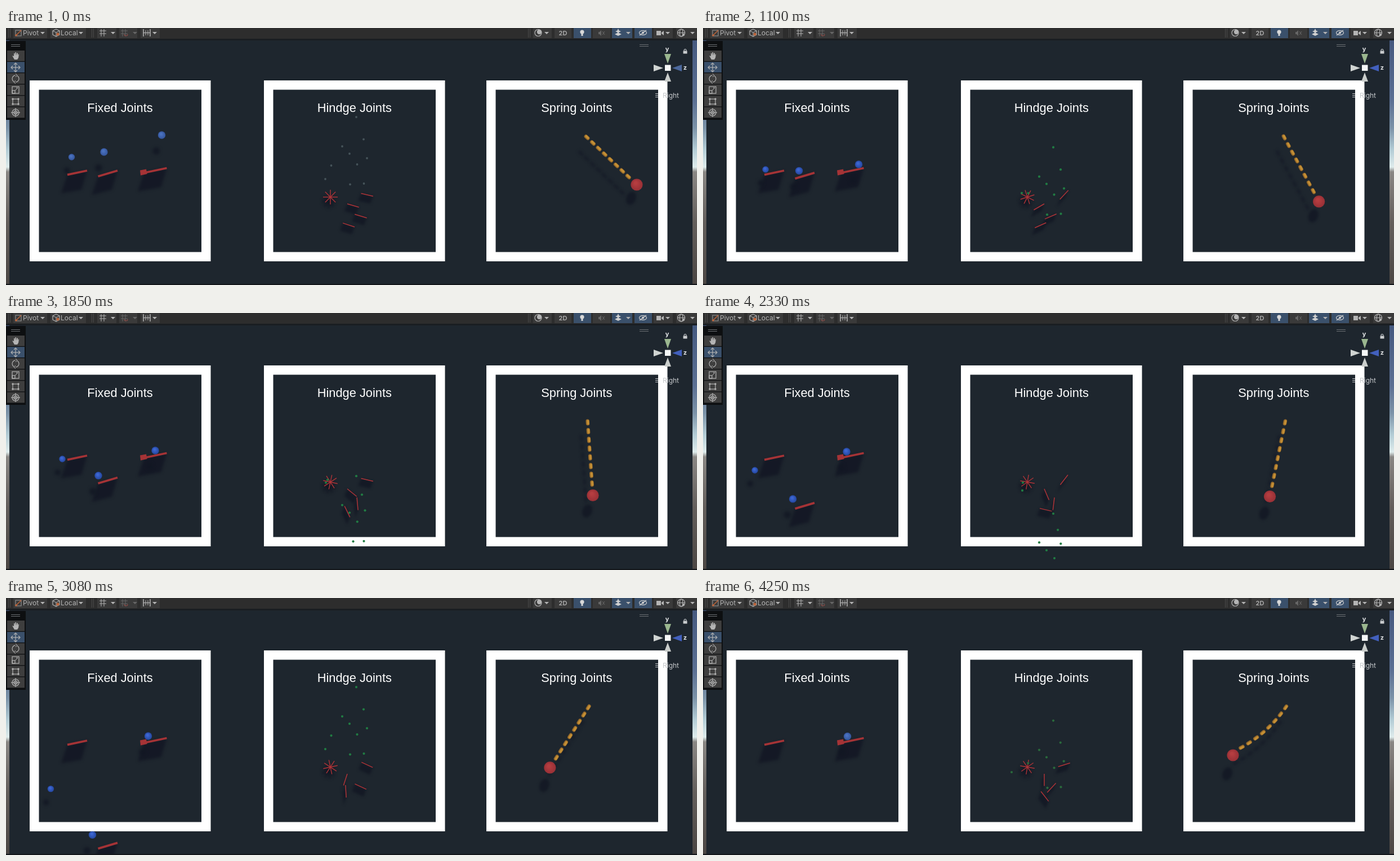
Recreate the animation shown at these times as an HTML page with a canvas. Size 1227x456 px, loop 4310 ms.

```html
<!DOCTYPE html>
<html lang="en">
<head>
<meta charset="utf-8">
<title>Physics joints</title>
<style>
  html, body { margin: 0; width: 100%; height: 100%; overflow: hidden; background: #1e262e; }
  canvas { display: block; width: 100vw; height: 100vh; }
</style>
</head>
<body>
<canvas id="stage" width="1227" height="456"></canvas>
<script>
const ctx = document.getElementById('stage').getContext('2d');
const LOOP = 4310, STEP = 68.5, LAST = 62, RESPAWN = 3.08;
const BG = '#1e262e', SHADOW = 'rgba(18,22,35,.8)', RED = '#a53336';
const TIMES = [0, 1.1, 1.85, 2.33, 3.08, 3.56, 4.25];

// ---------- drawing helpers ----------
function rect(x, y, w, h, color) {
  ctx.fillStyle = color;
  ctx.fillRect(x, y, w, h);
}
function poly(points, color) {
  ctx.beginPath();
  points.forEach(([x, y]) => ctx.lineTo(x, y));
  ctx.closePath();
  ctx.fillStyle = color;
  ctx.fill();
}
function line(points, color, width = 1) {
  ctx.beginPath();
  points.forEach(([x, y]) => ctx.lineTo(x, y));
  ctx.strokeStyle = color;
  ctx.lineWidth = width;
  ctx.stroke();
}
function disc(x, y, r, color) {
  ctx.beginPath();
  ctx.arc(x, y, r, 0, 7);
  ctx.fillStyle = color;
  ctx.fill();
}
function ring(x, y, rx, ry, color, from = 0, to = Math.PI * 2) {
  ctx.beginPath();
  ctx.ellipse(x, y, rx, ry, 0, from, to);
  ctx.strokeStyle = color;
  ctx.lineWidth = 1.2;
  ctx.stroke();
}
function box(x, y, w, h, color) {
  ctx.strokeStyle = color;
  ctx.lineWidth = 1.2;
  ctx.strokeRect(x, y, w, h);
}
function text(str, x, y, font, color, align = 'left') {
  ctx.font = font;
  ctx.fillStyle = color;
  ctx.textAlign = align;
  ctx.fillText(str, x, y);
}
function sphere(x, y, r, light, dark) {
  const g = ctx.createRadialGradient(x - r * .2, y - r * .3, r * .2, x, y, r);
  g.addColorStop(0, light);
  g.addColorStop(1, dark);
  disc(x, y, r, g);
}
function blurred(px, draw) {
  ctx.filter = `blur(${px}px)`;
  draw();
  ctx.filter = 'none';
}
const shift = (points, dx, dy) => points.map(([x, y]) => [x + dx, y + dy]);
const polar = (x, y, r, deg) =>
  [x + r * Math.cos(deg * Math.PI / 180), y + r * Math.sin(deg * Math.PI / 180)];

// ---------- motion helpers ----------
// Smooth curve through rows of [time, value, value...], at rest at both ends.
function track(t, rows) {
  const n = rows.length - 1;
  if (t <= rows[0][0]) return rows[0].slice(1);
  if (t >= rows[n][0]) return rows[n].slice(1);
  const i = rows.findIndex(r => r[0] > t) - 1;
  const [a, b] = [rows[i], rows[i + 1]], span = b[0] - a[0], u = (t - a[0]) / span;
  const slope = (k, c) => k === 0 || k === n ? 0
    : (rows[k + 1][c] - rows[k - 1][c]) / (rows[k + 1][0] - rows[k - 1][0]);
  return a.slice(1).map((v, j) => {
    const c = j + 1, w = b[c], u2 = u * u, u3 = u2 * u;
    return v * (2 * u3 - 3 * u2 + 1) + w * (3 * u2 - 2 * u3)
      + span * ((u3 - 2 * u2 + u) * slope(i, c) + (u3 - u2) * slope(i + 1, c));
  });
}
const along = (t, values) => track(t, values.map((v, i) => [TIMES[i], v]))[0];
const fall = t => 17 * t + 29.2 * t * t;
// Free fall from (x, y), then the given path from its first time on.
const drop = (t, x, y, rows) => t < rows[0][0] ? [x, y + fall(t)] : track(t, rows);

// ---------- fixed joints ----------
const pathB = [[.78, 174, 251], [1.1, 170.5, 253.5], [1.85, 164, 288.5], [2.33, 159.5, 330],
  [3.08, 153.5, 420], [3.56, 149.5, 492], [4.25, 144, 610]];
const pathC = [[1.08, 276.5, 242], [1.85, 265, 244], [2.33, 255, 246], [3.08, 252.5, 245],
  [3.56, 256, 246], [4.25, 256.5, 245.5]];
const plankDrop = [[.78, 0], [1.1, 4], [1.85, 39], [2.33, 84], [3.08, 181], [3.56, 255], [4.25, 380]];

function ballA(t) {
  if (t > 1.41) {
    const s = t - 1.85;
    return [100 - 16.7 * s, 259 + 27 * s + 30.5 * s * s];
  }
  return drop(t, 116.5, 229, [[.62, 116.5, 249.5], [1.1, 111, 251], [1.41, 107.3, 253]]);
}
function fixedScene(t) {
  const dy = track(t, plankDrop)[0];
  return {
    balls: [[...ballA(t), 5.7], [...drop(t, 174, 220, pathB), 6.7], [...drop(t, 276.5, 190, pathC), 6.7]],
    planks: [
      [[109, 260.3], [144, 253]],
      [[163.5, 263.3 + dy], [198, 253 + dy]],
      [[245, 257], [285.5, 248.5]]
    ]
  };
}
function fixedShadows({ balls, planks }) {
  blurred(2.5, () => {
    for (const [a, b] of planks)
      poly([a, b, [b[0] - 10, b[1] + 34], [a[0] - 11, a[1] + 33]], SHADOW);
    for (const [x, y, r] of balls)
      disc(x - 1.45 * r, y + 4.2 * r, r * .95, SHADOW);
  });
}
function fixedObjects({ balls, planks }, dull) {
  for (const p of planks) line(p, RED, 3.8);
  poly([[238, 252.5], [249, 250.5], [250.5, 259], [239, 261.5]], RED);
  for (const [x, y, r] of balls)
    sphere(x, y, r, dull ? '#4a72c0' : '#3d66d2', dull ? '#34559c' : '#2447a0');
}

// ---------- hinge joints ----------
// pivot x, pivot y, short arm, long arm, angles
const hinges = [
  [641.2, 296, 11, 11, [13.5, -47, 13.5, -52, 25, -38, -17]],
  [606, 312, 0, 21.5, [16, 150, 39, 67, 108, 118, 90]],
  [623.5, 331.8, 4.5, 18, [17, 157, 85, 97, 25, 54, 133]],
  [603.8, 348, 6, 16, [18, 156, 64, 13, -93, -155, -308]]
];
// start x, start y, sideways and vertical drift after a bump
const drops = [
  [622, 158, 0, 0], [635, 197.5, -3, -6.5], [597, 210, 0, -.5], [610, 223, 0, 0],
  [641, 231, -3.5, -12], [623.5, 242, .3, -3], [611, 277.5, 5.5, -3.5], [635.5, 276, 0, -2.5]
];
const wheelSlide = [[1.04, 577.5, 293], [1.85, 571, 296], [2.33, 568, 301], [2.8, 565, 325]];
const wheelRest = [[.68, 567, 293], [1.1, 566, 293], [1.85, 568, 301], [2.33, 567, 315], [2.8, 566, 340]];
const wheelThrow = [[.68, 567, 293], [1.17, 548, 309]];

function hingeScene(t) {
  const second = t > 2.79, s = second ? t - RESPAWN : t, bump = Math.max(0, (s - 1.1) / .75);
  const dots = drops.map(([x, y, dx, dy]) => [x + dx * bump, y + fall(s) + dy * bump]);
  dots.push(drop(s, 577.5, 244, wheelSlide), drop(s, 567, 268, second ? wheelThrow : wheelRest));
  const bars = hinges.map(([x, y, short, long, angles]) => {
    const a = along(t, angles);
    return [polar(x, y, -short, a), polar(x, y, long, a)];
  });
  const turn = along(t, [0, -18, -33, -35, -12, -20, -35]);
  const spokes = [0, 45, 90, 135].map(a => [polar(576, 300, -13, a + turn), polar(576, 300, 13, a + turn)]);
  return { dots, bars, spokes };
}
function hingeShadows({ bars, spokes }) {
  blurred(2.2, () => {
    for (const [a, b] of bars)
      poly([a, b, [b[0] - 5, b[1] + 13], [a[0] - 5, a[1] + 13]], SHADOW);
    for (const s of spokes) line(shift(s, -3, 8), 'rgba(18,22,35,.55)', 5);
  });
}
function hingeObjects({ dots, bars, spokes }, n) {
  for (const b of bars) line(b, '#b03438', 1.5);
  for (const s of spokes) line(s, '#b03438', 1.4);
  const color = n === 0 ? '#46545a' : n > 56 ? '#2a6a3c' : '#217c43';
  for (const [x, y] of dots) disc(x, y, n ? 2.1 : 1.9, color);
}

// ---------- spring joints ----------
const swing = [[0, 1120, 278], [1.1, 1093.5, 308], [1.85, 1042, 323.5], [2.33, 1006.5, 325.5],
  [3.08, 966, 301], [3.56, 949, 286], [4.25, 941, 279]];

function springScene(t) {
  const [bx, by] = track(t, swing);
  const sx = 1033 - .017 * (bx - 1033), sy = 194;
  const d = Math.hypot(bx - sx, by - sy), ux = (bx - sx) / d, uy = (by - sy) / d;
  const ex = bx - 21 * ux, ey = by - 21 * uy;
  const bow = along(t, [0, 0, 0, 0, 0, 3, 6]);
  const links = Array.from({ length: 8 }, (_, i) => {
    const u = i / 7, b = 4 * u * (1 - u) * bow, slope = 4 * (1 - 2 * u) * bow / (d - 21);
    return {
      x: sx + (ex - sx) * u + uy * b, y: sy + (ey - sy) * u - ux * b,
      angle: Math.atan2(uy - ux * slope, ux + uy * slope)
    };
  });
  return { bx, by, links };
}
function capsule({ x, y, angle }, dx, dy, layers) {
  ctx.save();
  ctx.translate(x + dx, y + dy);
  ctx.rotate(angle);
  for (const [half, width, color, offset] of layers) {
    ctx.lineCap = 'round';
    line([[-half, offset], [half, offset]], color, width);
  }
  ctx.restore();
}
function springShadows({ bx, by, links }) {
  blurred(2, () => {
    for (const l of links) capsule(l, -11, 28, [[2.5, 6, 'rgba(18,22,35,.5)', 0]]);
    ctx.beginPath();
    ctx.ellipse(bx - 10, by + 24 + (1120 - bx) / 20, 8.5, 12, .35, 0, 7);
    ctx.fillStyle = SHADOW;
    ctx.fill();
  });
}
function springObjects({ bx, by, links }) {
  for (const l of links)
    capsule(l, 0, 0, [[2.4, 6.4, '#94682a', 0], [2.2, 4, '#c48f35', -.6]]);
  ctx.lineCap = 'butt';
  sphere(bx, by, 10.6, '#b53d40', '#983036');
}

// ---------- editor surroundings ----------
function sky(x, w) {
  const g = ctx.createLinearGradient(0, 22, 0, 454);
  [[0, '#45597f'], [.25, '#5c7093'], [.36, '#7c93a8'], [.45, '#b4cdd6'], [.52, '#dfecec'],
   [.54, '#8a8784'], [.75, '#635e5b'], [1, '#4b4643']].forEach(s => g.addColorStop(...s));
  rect(x, 22, w, 432, g);
}
const FRAMES = [[42, 202.5, 'Fixed Joints'], [458, 618.8, 'Hindge Joints'], [853, 1013.3, 'Spring Joints']];
function frames() {
  for (const [x, mid, title] of FRAMES) {
    ctx.strokeStyle = '#fff';
    ctx.lineWidth = 16.5;
    ctx.strokeRect(x + 8.25, 101.25, 305, 304.5);
    text(title, mid, 149, '21.8px "Liberation Sans", Arial, sans-serif', '#fff', 'center');
  }
}

const ICON = '#b4b4b4', DIM = '#666', BUTTON = '#3a3a3a', ACTIVE = '#3a506b';
const UI = '12px Inter, sans-serif';
const caret = (x, color = ICON) => poly([[x - 4, 7], [x + 4, 7], [x, 11]], color);
const grip = (x, y) => { rect(x, y, 16, 1, '#6a6e72'); rect(x, y + 3, 16, 1, '#6a6e72'); };
function gridIcon(x, color) {
  for (const d of [-3, 2]) {
    line([[x + d, 2], [x + d, 15]], color);
    line([[x - 6, 8 + d], [x + 6, 8 + d]], color);
  }
}

function toolbar() {
  rect(0, 0, 1227, 22, '#1a1e22');
  rect(0, 0, 1227, 19, '#2d2d2d');
  const buttons = [[13, 60], [79, 63], [162, 34], [201, 32], [239, 34], [936, 33], [974, 30],
    [1008, 31, 1], [1042, 31], [1076, 36, 1], [1116, 31, 1], [1150, 34], [1190, 37]];
  for (const [x, w, on] of buttons) rect(x, 0, w, 18, on ? ACTIVE : BUTTON);
  for (const x of [4, 7, 152, 155, 927, 930]) rect(x, 1, 1, 16, '#4b4b4b');
  text('Pivot', 30, 13, UI, ICON);
  text('Local', 97, 13, UI, ICON);
  text('2D', 989, 13, '600 11px Inter, sans-serif', ICON, 'center');
  [65, 133, 190, 264, 960, 1105, 1175, 1219].forEach(x => caret(x));
  caret(229, DIM);

  box(17, 4, 10, 10, '#8d8d8d');
  line([[18, 13], [27, 4]], '#c0653a', 1.4);
  disc(18, 13, 1.8, '#c0653a');
  line([[89, 2], [95, 5], [95, 12], [89, 15], [83, 12], [83, 5], [89, 2]], ICON, 1.2);
  line([[83, 5], [89, 8], [95, 5]], ICON);
  line([[89, 8], [89, 15]], ICON);
  disc(92, 11, 2.5, '#c0653a');

  gridIcon(172, ICON);
  gridIcon(210, DIM);
  ring(213, 11, 3, 3, '#8a4a45', 0, Math.PI);
  for (const x of [244, 256]) line([[x, 2], [x, 15]], ICON, 1.5);
  for (const x of [248, 252]) line([[x, 4], [x, 13]], ICON);
  line([[244, 8.5], [256, 8.5]], ICON, 1.2);

  ring(945, 8.5, 6, 6, ICON);
  disc(947, 7, 4.2, ICON);
  disc(1023, 7, 3.6, '#d8d8d8');
  rect(1021.5, 10, 3, 4, '#d8d8d8');
  poly([[1052, 7], [1054, 7], [1057, 4], [1057, 14], [1054, 11], [1052, 11]], DIM);
  line([[1059, 6], [1063, 12]], DIM);
  line([[1063, 6], [1059, 12]], DIM);
  poly([[1081, 11], [1087, 8], [1093, 11], [1087, 14]], '#d0d0d0');
  poly([[1087, 1], [1088.5, 4.5], [1092, 6], [1088.5, 7.5], [1087, 10], [1085.5, 7.5], [1082, 6], [1085.5, 4.5]], '#d0d0d0');
  ring(1131, 8.5, 6.5, 3.8, '#d0d0d0');
  disc(1131, 8.5, 2, '#d0d0d0');
  line([[1125, 13], [1137, 4]], '#d0d0d0', 1.3);
  rect(1155, 5, 8, 8, ICON);
  poly([[1164, 8], [1168, 5], [1168, 13], [1164, 10]], ICON);
  ring(1199, 8.5, 6.5, 6.5, ICON);
  ring(1199, 8.5, 2.8, 6.5, ICON);
  line([[1192, 8.5], [1206, 8.5]], ICON);
  disc(1203, 12, 2, ICON);
}

function tools() {
  rect(0, 23, 35, 140, '#0d0f11');
  grip(9, 29);
  for (let i = 0; i < 6; i++) rect(2, 40 + i * 20.1, 31, 18.8, i === 1 ? ACTIVE : '#3e3e3e');
  // hand
  poly([[11, 49], [14, 50], [14, 45], [15.5, 44.5], [16, 49], [16.5, 43], [18, 43], [18.5, 49],
    [19.5, 44], [21, 44.5], [21, 49], [22, 46], [23, 47], [22, 53], [20, 56], [15, 56]], ICON);
  // move
  line([[10, 70], [24, 70]], ICON, 1.2);
  line([[17, 63], [17, 77]], ICON, 1.2);
  for (const s of [-1, 1]) {
    line([[17 + s * 5, 67], [17 + s * 8, 70], [17 + s * 5, 73]], ICON, 1.2);
    line([[14, 70 + s * 5], [17, 70 + s * 8], [20, 70 + s * 5]], ICON, 1.2);
  }
  // rotate
  ring(17, 90, 6, 6, ICON, -1, 1.6);
  ring(17, 90, 6, 6, ICON, 2.1, 4.7);
  line([[17, 81], [20, 84], [17, 87]], ICON);
  line([[17, 93], [14, 96], [17, 99]], ICON);
  // scale
  box(11, 104, 12, 12, ICON);
  box(11, 111, 5, 5, ICON);
  line([[16, 111], [21, 106], [18, 106]], ICON);
  // rect
  box(12, 126, 10, 9, ICON);
  for (const x of [12, 22]) for (const y of [126, 135]) disc(x, y, 1.7, ICON);
  // transform
  ring(17, 150, 6, 6, ICON);
  line([[9, 150], [25, 150]], ICON, 1.2);
  line([[17, 142], [17, 158]], ICON, 1.2);
  ring(17, 150, 3, 3, ICON);
}

function gizmo(dull) {
  grip(1125, 29);
  poly([[1169, 46], [1181, 46], [1175, 63]], '#9ab68f');
  poly([[1169, 95], [1181, 95], [1175, 79]], '#c9cdcb');
  poly([[1150, 65], [1150, 77], [1167, 71]], '#d0d4d2');
  poly([[1200, 65], [1200, 77], [1183, 71]], dull ? '#4c689c' : '#4260bd');
  rect(1170, 65.5, 10.5, 10.5, '#f4f6f6');
  text('y', 1174, 41, '700 11px Inter, sans-serif', '#e4e6e8', 'center');
  text('z', 1206, 74, '700 11px Inter, sans-serif', '#e4e6e8', 'center');
  rect(1202.5, 40.5, 7, 5, '#c9ccce');
  ring(1206, 40.5, 2, 3, '#c9ccce', Math.PI, Math.PI * 2);
  for (const y of [116, 119, 122]) rect(1153, y, 5, 1, '#c2c5c8');
  text('Right', 1166, 123.5, UI, '#c6c9cc');
}

// ---------- playback ----------
function draw(n) {
  const t = n * STEP / 1000, dull = n === 0;
  const fixed = fixedScene(t), hinge = hingeScene(t), spring = springScene(t);
  rect(0, 0, 1227, 456, BG);
  fixedShadows(fixed);
  hingeShadows(hinge);
  springShadows(spring);
  frames();
  fixedObjects(fixed, dull || n > 56);
  hingeObjects(hinge, n);
  springObjects(spring);
  sky(0, 6);
  sky(1219, 8);
  rect(0, 454, 1227, 2, '#13161a');
  toolbar();
  tools();
  gizmo(dull);
}

const start = performance.now();
let shown = -1;
function tick() {
  const time = Math.max(0, performance.now() - start) % LOOP;
  const n = Math.min(LAST, Math.floor((time + 6) / STEP));
  if (n !== shown) draw(shown = n);
  requestAnimationFrame(tick);
}
tick();
</script>
</body>
</html>
```
